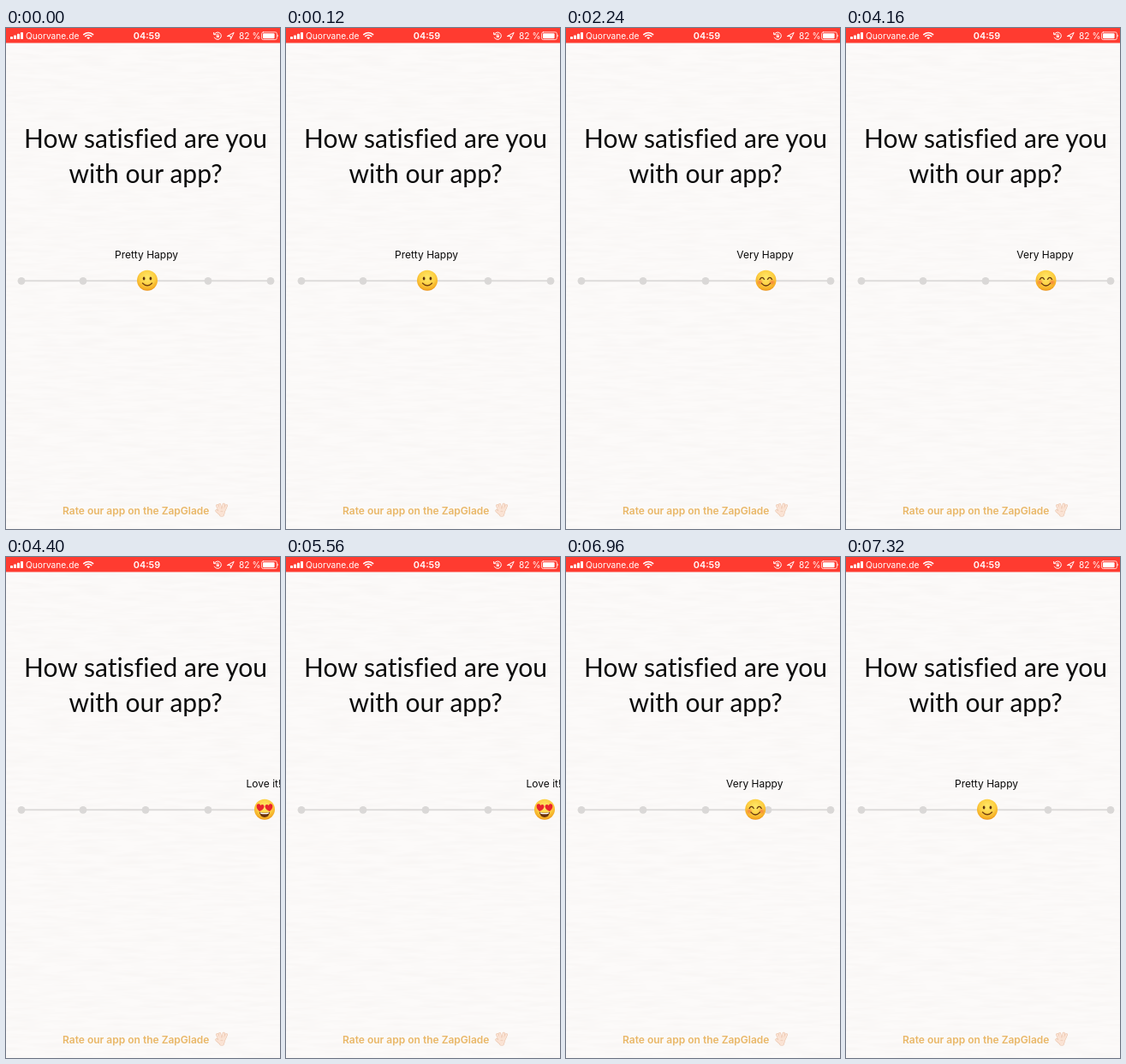
An HTML page for the animation above (8000 ms loop, 320 by 585 pixels).

```html
<!DOCTYPE html>
<html lang="en">
<head>
<meta charset="utf-8">
<title>Satisfaction slider</title>
<style>
  html, body { margin: 0; width: 100%; height: 100%; overflow: hidden; background: #fcfaf9; }
  svg { display: block; width: 100%; height: 100%; }
  text { font-family: Inter, Roboto, sans-serif; }
  .title { font: 30px Lato, "Open Sans", sans-serif; fill: #0b0b0b; text-anchor: middle; letter-spacing: .04px; }
  .label { font-size: 12px; fill: #080808; text-anchor: middle; }
  .footer { font-size: 12px; font-weight: 600; fill: #e9b767; }
  .status { font-size: 10.2px; fill: #fff; }
  .line { fill: none; stroke-linecap: round; stroke-linejoin: round; }
</style>
</head>
<body>
<svg viewBox="0 0 320 585" preserveAspectRatio="none">
  <defs>
    <radialGradient id="skin" cx=".5" cy=".36" r=".66">
      <stop offset="0" stop-color="#ffe96b"/>
      <stop offset=".55" stop-color="#fdd043"/>
      <stop offset=".85" stop-color="#f5ae25"/>
      <stop offset="1" stop-color="#e58a17"/>
    </radialGradient>
    <radialGradient id="blush">
      <stop offset="0" stop-color="#f4693b" stop-opacity=".75"/>
      <stop offset="1" stop-color="#f4693b" stop-opacity="0"/>
    </radialGradient>
    <filter id="paper" x="0" y="0" width="100%" height="100%">
      <feTurbulence type="fractalNoise" baseFrequency=".025 .22" numOctaves="2" seed="4"/>
      <feColorMatrix values="0 0 0 0 .82  0 0 0 0 .79  0 0 0 0 .77  .36 0 0 0 -.12"/>
    </filter>
    <path id="heart" d="M0 3.8C-2 2.3-3.7.8-3.7-1.2C-3.7-3.6-.9-4 0-2C.9-4 3.7-3.6 3.7-1.2C3.7.8 2 2.3 0 3.8Z" fill="#e9252d"/>
  </defs>

  <rect width="320" height="585" fill="#fcfaf9"/>
  <rect y="17" width="320" height="568" filter="url(#paper)"/>

  <!-- status bar -->
  <rect width="320" height="17.5" fill="#ff3b30"/>
  <g fill="#fff">
    <rect x="5" y="10" width="3" height="3" rx=".6"/>
    <rect x="9" y="8.5" width="3" height="4.5" rx=".6"/>
    <rect x="13" y="6.7" width="3" height="6.3" rx=".6"/>
    <rect x="17" y="5" width="3" height="8" rx=".6"/>
    <path d="M94.3 11.2Q96.2 9.6 98.1 11.2L96.2 13.2Z"/>
    <path d="M258.3 9.6L266.2 5.4L262.3 13.3V9.6Z" fill="none" stroke="#fff" stroke-linejoin="round"/>
    <rect x="300" y="6.2" width="13.6" height="6" rx="1"/>
    <path d="M317.4 7.6Q319 9.2 317.4 10.8Z"/>
  </g>
  <g class="line" stroke="#fff">
    <path d="M90.7 7.6Q96.2 3.2 101.7 7.6M92.6 9.6Q96.2 6.7 99.8 9.6" stroke-width="1.5"/>
    <path d="M243.4 7.2A4.2 4.2 0 1 1 243.4 11.2M242.7 5.4V7.7H245"/>
    <rect x="245.8" y="8.7" width="3" height="2.4" fill="#fff" stroke="none"/>
    <path d="M246.3 8.7V8A1 1 0 0 1 248.3 8V8.7" stroke-width=".7"/>
    <rect x="298.6" y="4.8" width="17.8" height="8.8" rx="2" stroke-width=".8"/>
  </g>
  <text class="status" x="23" y="13">Quorvane.de</text>
  <text class="status" x="164.5" y="13" text-anchor="middle" style="font-size:10.8px;font-weight:600">04:59</text>
  <text class="status" x="272" y="13">82 %</text>

  <text class="title" x="163" y="140">How satisfied are you</text>
  <text class="title" x="163" y="180.5">with our app?</text>

  <!-- slider -->
  <path d="M18 295.3H309" stroke="#dddbda" stroke-width="2"/>
  <g id="stops" fill="#dad8d7"></g>
  <text id="label" class="label" y="269"></text>
  <g id="thumb">
    <circle r="12" fill="url(#skin)"/>
    <g class="face">
      <ellipse cx="-3.9" cy="-2.2" rx="1.35" ry="2" fill="#613511"/>
      <ellipse cx="3.9" cy="-2.2" rx="1.35" ry="2" fill="#613511"/>
      <path class="line" d="M-5.5 3.2Q0 8.8 5.5 3.2" stroke="#75400f" stroke-width="1.4"/>
    </g>
    <g class="face">
      <circle cx="-7.2" cy="2" r="4" fill="url(#blush)"/>
      <circle cx="7.2" cy="2" r="4" fill="url(#blush)"/>
      <path class="line" d="M-7-1.3Q-4.5-5.5-2-1.3M2-1.3Q4.5-5.5 7-1.3M-5.2 3.3Q0 9 5.2 3.3" stroke="#693a11" stroke-width="1.4"/>
    </g>
    <g class="face">
      <path d="M-6.2 3Q0 5 6.2 3Q5 9.2 0 9.2Q-5 9.2-6.2 3Z" fill="#68300f"/>
      <path d="M-5.2 3.5Q0 5 5.2 3.5L4.6 5Q0 6-4.6 5Z" fill="#fff"/>
      <use href="#heart" transform="translate(-5.2 -2.2) rotate(10) scale(1.2)"/>
      <use href="#heart" transform="translate(5.2 -2.2) rotate(-10) scale(1.2)"/>
    </g>
  </g>

  <!-- footer -->
  <text class="footer" x="66" y="567.5">Rate our app on the ZapGlade</text>
  <g class="line" opacity=".85">
    <path id="hand" d="M249.3 564L246.8 557.7M251 563L249.5 556.7M253 563L254.3 556.4M254.5 564L257.3 557.8M249.5 567L246 563.8M250 565.5H254.2L253 569H251Z" stroke="#e5b697" stroke-width="3.2"/>
    <use href="#hand" style="display:none"/>
    <path d="M249.3 564L246.8 557.7M251 563L249.5 556.7M253 563L254.3 556.4M254.5 564L257.3 557.8M249.5 567L246 563.8M250 565.5H254.2L253 569H251Z" stroke="#fbe0cf" stroke-width="2.2" fill="#fbe0cf"/>
  </g>
</svg>

<script>
const LOOP = 8000;
const moods = [
  { x: 165, labelX: 164, text: "Pretty Happy" },
  { x: 233.5, labelX: 232.5, text: "Very Happy" },
  { x: 302, labelX: 301, text: "Love it!" }
];
const moves = [
  { start: 1720, duration: 340, to: 1 },
  { start: 4160, duration: 240, to: 2 },
  { start: 5560, duration: 400, to: 1 },
  { start: 6880, duration: 300, to: 0 }
];
const thumb = document.getElementById("thumb");
const label = document.getElementById("label");
const faces = document.querySelectorAll(".face");

document.getElementById("stops").innerHTML = [18, 90, 163, 236, 309]
  .map(x => `<circle cx="${x}" cy="295.3" r="4.4"/>`).join("");

const mix = (a, b, k) => a + (b - a) * k;
const smooth = k => k * k * (3 - 2 * k);

// Slider position in mood units, 0 to 2.
function valueAt(time) {
  let value = 0;
  for (const { start, duration, to } of moves) {
    const k = Math.min(1, Math.max(0, (time - start) / duration));
    value = mix(value, to, smooth(k));
  }
  return value;
}

function draw(time) {
  const value = valueAt(time);
  const low = Math.min(1, Math.floor(value));
  const along = key => mix(moods[low][key], moods[low + 1][key], value - low);
  const nearest = Math.round(value);
  thumb.setAttribute("transform", `translate(${along("x")} 294.8)`);
  label.setAttribute("x", along("labelX"));
  label.textContent = moods[nearest].text;
  faces.forEach((face, i) => face.style.display = i === nearest ? "" : "none");
}

const origin = performance.now();
function frame() {
  draw((performance.now() - origin) % LOOP);
  requestAnimationFrame(frame);
}
frame();
</script>
</body>
</html>
```
